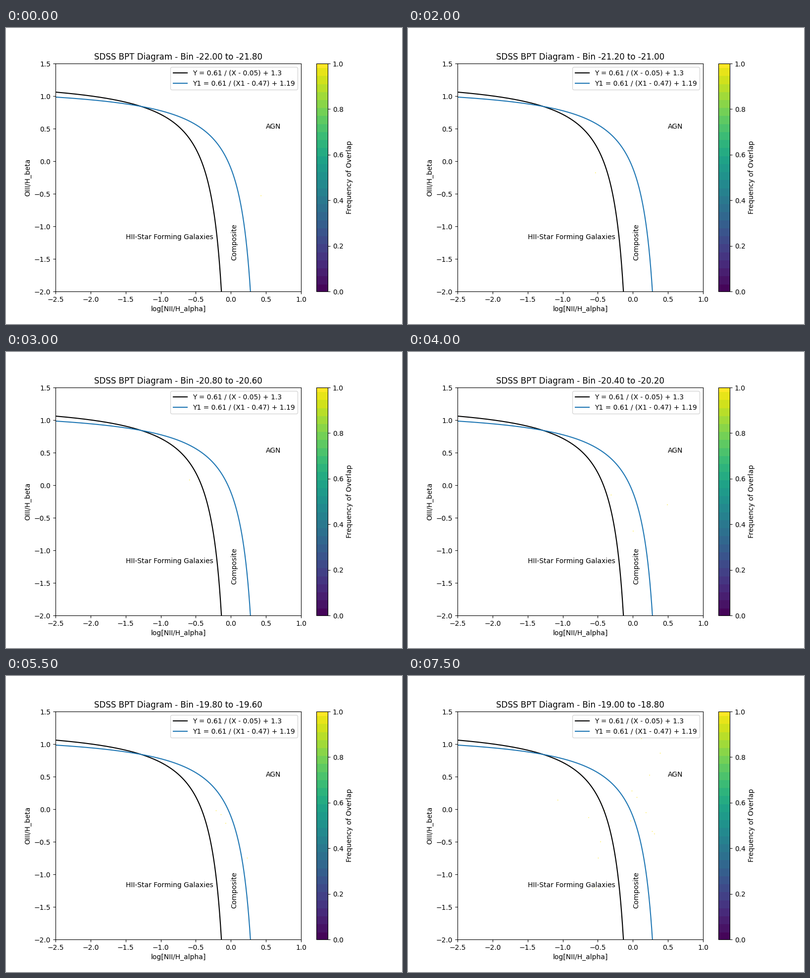
These frames come from a looping animation (800x600 px, 8 s). A matplotlib script:

```python
import numpy as np
import matplotlib.pyplot as plt
from matplotlib.animation import FuncAnimation
from matplotlib.cm import ScalarMappable
from matplotlib.collections import PolyCollection
from matplotlib.colors import ListedColormap, Normalize

START, STEP = -22.0, 0.2
CELL = 0.01

# Occupied cells (log NII/Ha, OIII/Hb) of each magnitude bin
BINS = [
    [(0.43, -0.53)],
    [],
    [(-0.605, -0.07)],
    [(-0.58, -0.475)],
    [(-0.533, -0.178)],
    [(0.18, -1.06)],
    [(-0.59, 0.08)],
    [(-0.644, -0.2), (-0.157, -0.515)],
    [(0.492, -0.3), (0.005, -0.705), (-0.31, -0.15)],
    [(-0.87, -0.02), (-0.242, -0.258), (0.323, -0.58)],
    [(-0.623, -0.15), (-0.1, -0.455)],
    [(-0.21, -0.023), (-0.14, -0.083), (-0.073, -0.216), (0.234, -0.75)],
    [(-0.983, 0.06), (-0.242, -0.227), (0.196, -0.909), (-0.418, -0.568)],
    [(-0.87, 0.27), (-0.63, 0.508), (-0.58, -0.049), (-0.122, -0.068),
     (0.443, -0.31), (0.097, -0.295)],
    [(-1.131, 0.227), (-0.58, -0.818), (-0.171, -0.15), (0.005, -0.455)],
    [(0.122, 1.083), (0.39, 0.86), (0.238, 0.523), (-0.013, 0.28),
     (0.058, 0.182), (-1.07, 0.14), (0.188, -0.053), (-0.63, -0.129),
     (-0.404, -0.019), (-0.03, -0.18), (0.277, -0.341), (0.308, -0.379),
     (-0.461, -0.5), (-0.493, -0.75), (-0.53, -1.212)],
]

# Viridis in flat bands
viridis = plt.get_cmap("viridis")
band = (np.arange(256) + 1) // 9
cmap = ListedColormap(viridis(np.clip(9 * band + 3, 0, 255)))

fig, ax = plt.subplots(figsize=(8, 6), dpi=100)
fig.colorbar(ScalarMappable(Normalize(0, 1), cmap), ax=ax,
             label="Frequency of Overlap")

x = np.linspace(-2.5, 0.04, 1000)
x1 = np.linspace(-2.5, 0.46, 1000)
ax.plot(x, 0.61 / (x - 0.05) + 1.3, color="black",
        label="Y = 0.61 / (X - 0.05) + 1.3")
ax.plot(x1, 0.61 / (x1 - 0.47) + 1.19, color="tab:blue",
        label="Y1 = 0.61 / (X1 - 0.47) + 1.19")

ax.set(xlim=(-2.5, 1), ylim=(-2, 1.5),
       xlabel="log[NII/H_alpha]", ylabel="OIII/H_beta")
ax.text(-1.5, -1.2, "HII-Star Forming Galaxies")
ax.text(0, -1.5, "Composite", rotation=90)
ax.text(0.5, 0.5, "AGN")
ax.legend(loc="upper right")
title = ax.set_title("")

cells = PolyCollection([], facecolor=viridis(1.0), linewidth=0, zorder=1)
cells.set_snap(False)
ax.add_collection(cells, autolim=False)

corners = CELL / 2 * np.array([(-1, -1), (1, -1), (1, 1), (-1, 1)])


def draw(i):
    low = START + STEP * i
    title.set_text(f"SDSS BPT Diagram - Bin {low:.2f} to {low + STEP:.2f}")
    cells.set_verts([corners + point for point in BINS[i]])
    return title, cells


anim = FuncAnimation(fig, draw, frames=len(BINS), interval=500,
                     repeat=True, repeat_delay=0)
plt.show()
```
